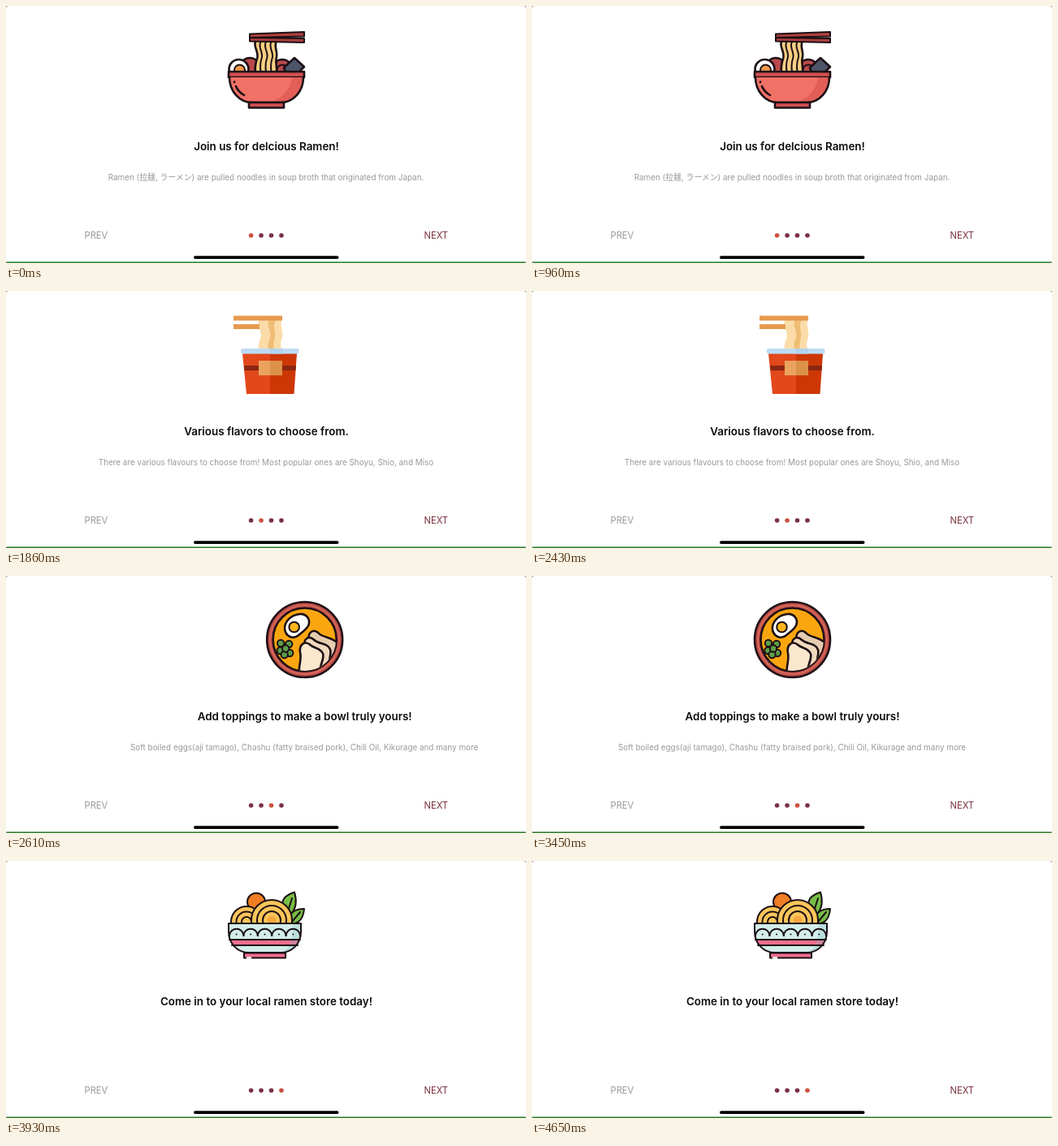
An HTML page for the animation above (4.68 s loop, 640 px wide and 317 px high).

```html
<!DOCTYPE html>
<html lang="en">
<head>
<meta charset="utf-8">
<title>Ramen onboarding</title>
<style>
  html, body { margin: 0; width: 100%; height: 100%; overflow: hidden; background: #777; }
  svg { display: block; width: 100%; height: 100%; }
  text { font-family: Inter, "Noto Sans CJK JP", "Noto Sans CJK", sans-serif; }
  .title { font-size: 13.4px; font-weight: 600; text-anchor: middle; fill: #0c0c0c; }
  .note { font-size: 9.9px; text-anchor: middle; fill: #999; }
  .nav { font-size: 11.2px; }
  .ink { stroke: #1d1015; stroke-width: 2.6; stroke-linejoin: round; stroke-linecap: round; }
  .thin { stroke-width: 2; }
  .line { fill: none; }
</style>
</head>
<body>
<svg viewBox="0 0 640 317" preserveAspectRatio="none">
  <defs>
    <clipPath id="soup"><circle cx="320.5" cy="78.5" r="38.5"/></clipPath>
    <clipPath id="bowl"><path d="M276 88H365C365 105 354 119 338 119H303C287 119 276 105 276 88Z"/></clipPath>
    <clipPath id="dish"><path d="M274 77H363V87C363 102 352 113 338 113H299C285 113 274 102 274 87Z"/></clipPath>
    <clipPath id="aboveDish"><path d="M265 25H375V77H265Z"/></clipPath>
  </defs>
  <rect width="640" height="317" rx="3" fill="#fff"/>

  <g class="page">
    <g class="ink">
      <circle cx="300" cy="76" r="12" fill="#b94a4c"/>
      <circle cx="340" cy="78" r="12" fill="#b94a4c"/>
      <circle class="line thin" cx="340" cy="79" r="6.5"/>
      <circle cx="286.500" cy="78" r="12" fill="#fff"/>
      <circle class="thin" cx="287.500" cy="79" r="6.500" fill="#ef9a4d"/>
      <path d="M342 76L355 64L367 75L360 82H344Z" fill="#4d5568"/>
      <path d="M307 43C304 51 312 57 309 65C307 71 306 75 307 82H333C334 75 331 70 333 63C335 56 329 51 333 43Z" fill="#f7cf83"/>
      <g id="strands" class="line thin"></g>
      <path class="thin" d="M300 34.500L367 32V37.500L300 39Z" fill="#b0403f"/>
      <path class="thin" d="M300 39L367 40V45L300 43.500Z" fill="#b0403f"/>
      <path d="M274 81H367V88H274Z" fill="#cf4f4f"/>
      <path d="M276 88H365C365 105 354 119 338 119H303C287 119 276 105 276 88Z" fill="#f07166" stroke="none"/>
      <path clip-path="url(#bowl)" d="M352 88H366V120H318C338 117 350 105 352 88Z" fill="#e25f58" stroke="none"/>
      <path class="line" d="M275 88C275 105 287 119 303 119H338C354 119 366 105 366 88"/>
      <path d="M299 119H342V125.500H299Z" fill="#cf4f4f"/>
      <path class="line" d="M281 93.500V94M283 99C285 104 288 107 293 110"/>
    </g>
    <text class="title" x="320.500" y="178">Join us for delcious Ramen!</text>
    <text class="note" x="320" y="215">Ramen (拉麺, ラーメン) are pulled noodles in soup broth that originated from Japan.</text>
  </g>

  <g class="page">
    <path d="M312 34C307 44 317 51 313 59C311 64 310 68 311 73H340C337 67 338 63 340 57C342 49 336 43 340 34Z" fill="#fbdca9"/>
    <path d="M324 36C319 45 329 50 324 60C322 65 322 69 323 73H330C329 68 329 64 331 58C333 49 327 45 332 36Z" fill="#efbd76"/>
    <path d="M280 30.500H340V36.500H280ZM280 41H312V47H280Z" fill="#e59b4d"/>
    <path d="M291 77H325V127H296Z" fill="#e2481b"/>
    <path d="M325 77H358L354.500 127H325Z" fill="#cd3706"/>
    <path d="M293 92H357L356.500 98H293.500Z" fill="#8b2710"/>
    <path d="M311 86H325V104H311Z" fill="#eaa35f"/>
    <path d="M325 86H340V104H325Z" fill="#dc9149"/>
    <rect x="289" y="71" width="71.500" height="6.500" rx="2" fill="#bddbf6"/>
    <path d="M325 71H340V77.500H325Z" fill="#b2d3f1"/>
    <text class="title" x="320.500" y="178">Various flavors to choose from.</text>
    <text class="note" x="320" y="215">There are various flavours to choose from! Most popular ones are Shoyu, Shio, and Miso</text>
  </g>

  <g class="page">
    <g class="ink">
      <circle cx="320.500" cy="78.500" r="46.500" fill="#bd4c45"/>
      <circle class="line" cx="320.500" cy="78.500" r="42.500" style="stroke:#d4685c;stroke-width:2"/>
      <circle cx="320.500" cy="78.500" r="39" fill="#fca60f"/>
      <g clip-path="url(#soup)">
        <path d="M333 121C346 106 334 94 327 80C322 71 331 64 337 70C343 77 354 74 362 84V121Z" fill="#e6cdb1"/>
        <path d="M326 121C337 106 330 98 322 87C317 79 325 73 331 78C338 85 349 82 352 91C354 99 347 106 352 121Z" fill="#f1d9bd"/>
        <path d="M314 121C312 112 317 105 315 95C313 85 320 80 326 84C332 90 340 88 343 96C345 105 337 110 340 121Z" fill="#fbe7ce"/>
      </g>
      <path d="M296 66C295 56 304 48 314 47C323 46 328 54 325 61C322 67 317 69 313 73C306 79 297 74 296 66Z" fill="#fff"/>
      <circle class="thin" cx="307.500" cy="63" r="6.300" fill="#fdb51c"/>
      <g id="peas" class="thin" fill="#5b9e46"></g>
    </g>
    <text class="title" x="320.500" y="178">Add toppings to make a bowl truly yours!</text>
    <text class="note" x="320" y="215">Soft boiled eggs(aji tamago), Chashu (fatty braised pork), Chili Oil, Kikurage and many more</text>
  </g>

  <g class="page">
    <g class="ink thin">
      <path d="M342 59C337 48 344 42 355 38.500C358 48 358 57 351 66Z" fill="#78bd45"/>
      <path d="M349 76C347 64 356 59 367 59C366 69 362 76 354 77Z" fill="#78bd45"/>
      <path class="line" d="M352 46L347 62M362 63L352 75"/>
      <circle cx="308" cy="50.500" r="11" fill="#ee7d23"/>
      <g id="rolls" clip-path="url(#aboveDish)" fill="#fac55a"></g>
      <g clip-path="url(#dish)" stroke="none">
        <path d="M273 77H364V114H273Z" fill="#d3eeea"/>
        <path d="M273 97H364V104H273Z" fill="#f06f91"/>
        <path d="M353 77H364V114H338C350 108 353 97 353 77Z" fill="#7fb9bc" opacity=".3"/>
      </g>
      <path class="line" d="M275 97H362M278 104H359"/>
      <g id="scallops" class="line"></g>
      <path class="line" d="M274 77H363V87C363 102 352 113 338 113H299C285 113 274 102 274 87Z"/>
      <path d="M293 113.500H344V119.500H293Z" fill="#f06f91"/>
      <path d="M297 119.500H301" style="stroke:#fff;stroke-width:2.500"/>
    </g>
    <text class="title" x="320.500" y="178">Come in to your local ramen store today!</text>
  </g>

  <text class="nav" x="96.500" y="287" fill="#999">PREV</text>
  <text class="nav" x="514.500" y="287" fill="#79303d">NEXT</text>
  <g id="dots"></g>
  <rect x="231" y="308.200" width="178.500" height="3.800" rx="1.900" fill="#000"/>
  <rect x="1" y="315.500" width="638" height="1.500" fill="#277a27"/>
</svg>
<script>
const LOOP = 4680, TICK = 30, SLIDE = 56, WIDTH = 640;
const taps = [1303.8, 2563.8, 3830.3];
const pages = [...document.querySelectorAll('.page')];

function add(id, tag, attrs) {
  const el = document.createElementNS('http://www.w3.org/2000/svg', tag);
  for (const key in attrs) el.setAttribute(key, attrs[key]);
  return document.getElementById(id).appendChild(el);
}
const circle = (id, cx, cy, r, extra) => add(id, 'circle', { cx, cy, r, ...extra });

for (const x of [313.5, 320, 326.5])
  add('strands', 'path', { d: `M${x} 44c-4 8 4 13 1 21c-2 6-2 9-1 16` });

for (const [x, y] of [[291, 83], [301, 84], [290.5, 92], [302, 95], [295.5, 97], [297, 89.5]])
  circle('peas', x, y, 4.2);

for (const r of [19, 12.5, 6]) circle('rolls', 296, 75, r);
for (const r of [25, 18, 11]) circle('rolls', 327, 73, r);
circle('rolls', 327, 73, 5.5, { fill: '#f5a83d', stroke: 'none' });

for (let i = 0; i < 5; i++) {
  const x = 275 + i * 17.4;
  add('scallops', 'path', { d: `M${x} 92c1-11 16.400-11 17.400 0M${x + 8.7} 90.500v.1` });
}

const dots = pages.map((_, i) => circle('dots', 301.6 + i * 12.45, 283, 2.8));

const ease = p => (1 - Math.cos(Math.PI * p)) / 2;

function draw(now) {
  const t = Math.floor((now % LOOP) / TICK) * TICK;
  let scroll = 0, current = 0;
  for (const tap of taps) {
    scroll += WIDTH * ease(Math.min(1, Math.max(0, (t - tap) / SLIDE)));
    if (t >= tap) current++;
  }
  pages.forEach((page, i) => page.setAttribute('transform', `translate(${i * WIDTH - scroll})`));
  dots.forEach((dot, i) => dot.setAttribute('fill', i === current ? '#cb5040' : '#7b3044'));
}

const start = performance.now();
function frame() {
  draw(performance.now() - start);
  requestAnimationFrame(frame);
}
frame();
</script>
</body>
</html>
```
